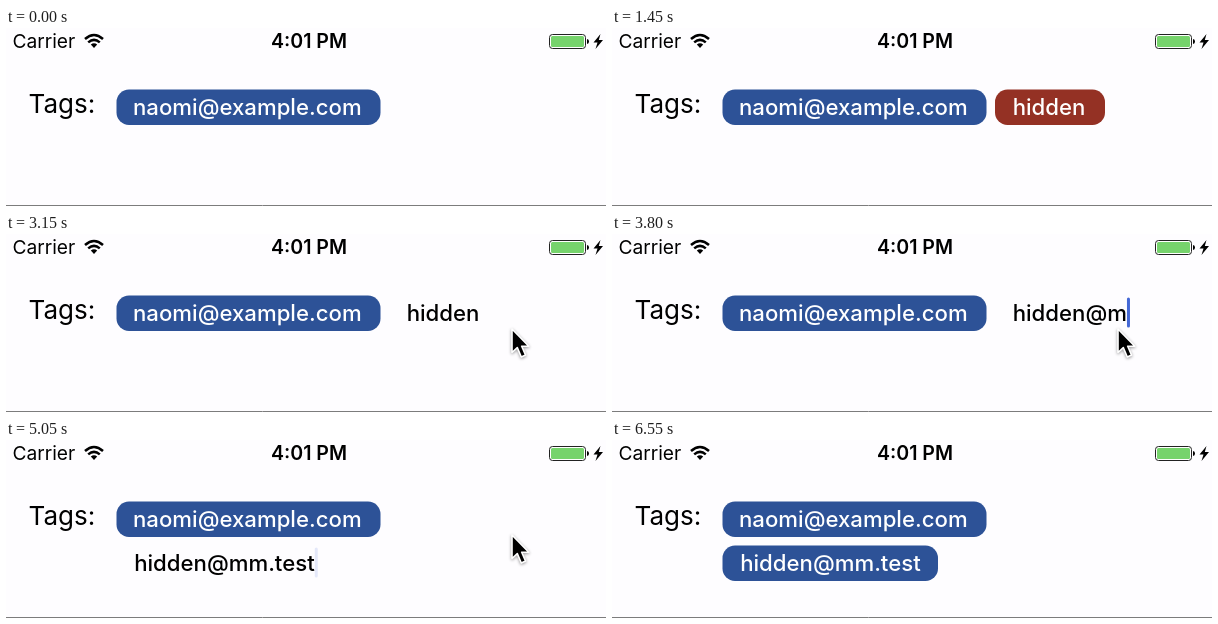
Animation, 600 px wide and 178 px high, one loop 6.6 s. Source, as an HTML page:

```html
<!DOCTYPE html>
<html lang="en">
<head>
<meta charset="utf-8">
<title>Tag field</title>
<style>
  html, body { margin: 0; width: 100%; height: 100%; overflow: hidden; background: #fefdff; }
  svg { display: block; width: 600px; height: 178px; font-family: Inter, Roboto, sans-serif; }
  .tag { font-size: 22.2px; font-weight: 500; white-space: pre; }
</style>
</head>
<body>
<svg viewBox="0 0 600 178">
  <g id="status">
    <text x="6.500" y="20" font-size="19.2">Carrier</text>
    <text x="303" y="20" font-size="19.6" font-weight="600" text-anchor="middle">4:01 PM</text>
    <g fill="none" stroke="#000" stroke-width="2.500">
      <path d="M79 11Q88 3 97 11M82.200 14.400Q88 9.400 93.800 14.400"/>
      <path d="M84.800 16.600Q88 14 91.200 16.600L88 20Z" fill="#000" stroke="none"/>
    </g>
    <rect x="543.500" y="6.500" width="36" height="14" rx="3" fill="#fff" stroke="#222"/>
    <rect x="545" y="8" width="33" height="11" rx="1.500" fill="#76d36c"/>
    <path d="M581 11q2 .4 2 2.500t-2 2.500z"/>
    <path d="M594.500 6l-7 8.400h4l-2 6.600 7.500-9h-4.200z"/>
  </g>
  <text x="22.500" y="85" font-size="26">Tags:</text>
  <rect x="110.500" y="61.500" width="264" height="35.500" rx="12.500" fill="#2d5297"/>
  <text class="tag" x="127" y="87" fill="#fff">naomi@example.com</text>
  <rect id="pill" height="35.500" rx="12.500"/>
  <text id="entry" class="tag"></text>
  <rect id="caret" width="3" height="30" rx="1.500" fill="#4468d6"/>
  <path d="M0 177.500H600" stroke="#7c7c7c"/>
  <path id="pointer" d="M0 0V23.500L5.300 18.600L9.300 28L13.600 26.100L9.700 17.200H16.800Z"
        stroke="#fff" stroke-width="1.600" stroke-linejoin="round"
        style="filter: drop-shadow(0 1px 1.500px #0006)"/>
</svg>
<script>
const [pill, entry, caret, pointer] =
  ['pill', 'entry', 'caret', 'pointer'].map(id => document.getElementById(id));

const LOOP = 6600, STEP = 50;
const WORD = 'hidden', TAIL = '@mm.test';

// Moments of the story, in ms.
const FOCUS = 50, TYPE = 150, TAGGED = 950;
const ENTER = 1750, PRESS = 2300, EDIT = 2500;
const APPEND = 3600, WRAP = 4250, DONE = 5150, LEAVE = 5500, GONE = 5650;
const WORD_PACE = 110, TAIL_PACE = 130;

const clamp = v => Math.max(0, Math.min(1, v));
const progress = (t, from, to) => clamp((t - from) / (to - from));
const ease = p => p * p * (3 - 2 * p);

function set(el, attrs) {
  for (const name in attrs) el.setAttribute(name, attrs[name]);
}

// Number of keys pressed by time t, for a run of keys at an even pace.
const keys = (t, start, pace, max) =>
  Math.max(0, Math.min(max, Math.floor((t - start) / pace) + 1));
const wordKeys = t => keys(t, TYPE, WORD_PACE, WORD.length);
const tailKeys = t => keys(t, APPEND, TAIL_PACE, TAIL.length);
const countAt = t => wordKeys(t) + tailKeys(t);

// Time of the latest key or focus; the caret blink restarts there.
function lastInput(t) {
  if (tailKeys(t)) return APPEND + (tailKeys(t) - 1) * TAIL_PACE;
  if (t >= EDIT) return EDIT;
  return wordKeys(t) ? TYPE + (wordKeys(t) - 1) * WORD_PACE : FOCUS;
}

// Solid, fade out, dark, fade in, once a second.
function blink(age) {
  const phase = age % 1000;
  return Math.max(1 - progress(phase, 350, 570), progress(phase, 850, 1000));
}

function drawEntry(t) {
  const second = t >= WRAP;
  const left = second ? 110.5 : 383;
  const top = second ? 105.5 : 61.5;
  const textX = left + 17.7;
  const red = t >= TAGGED && t < EDIT;
  const blue = t >= DONE;

  set(pill, {
    x: left, y: top, width: second ? 215.5 : 110,
    fill: blue ? '#2d5297' : t < PRESS ? '#943124' : '#8c2d21',
    visibility: red || blue ? 'visible' : 'hidden'
  });

  entry.textContent = (WORD + TAIL).slice(0, countAt(t));
  set(entry, { x: textX, y: top + 25.5, fill: red || blue ? '#fff' : '#000' });

  // The caret trails the newest character by one step.
  const before = countAt(t - STEP);
  const width = before ? entry.getSubStringLength(0, before) : 0;
  const editing = t >= FOCUS && !red && !blue;
  set(caret, { x: textX + width, y: top + 2, opacity: editing ? blink(t - lastInput(t)) : 0 });
}

function drawPointer(t) {
  const enter = ease(progress(t, ENTER, 2150));
  const settle = ease(progress(t, 2350, 2700));
  const leave = progress(t, LEAVE, GONE);
  const x = 479 + 21 * enter + 6 * settle - 27 * leave;
  const y = 180 - 95 * enter + 10 * settle + 85 * leave;
  set(pointer, {
    transform: `translate(${x} ${y})`,
    visibility: t > ENTER && t < GONE ? 'visible' : 'hidden'
  });
}

function tick() {
  const t = Math.floor(performance.now() % LOOP / STEP) * STEP;
  drawEntry(t);
  drawPointer(t);
  requestAnimationFrame(tick);
}
tick();
</script>
</body>
</html>
```
